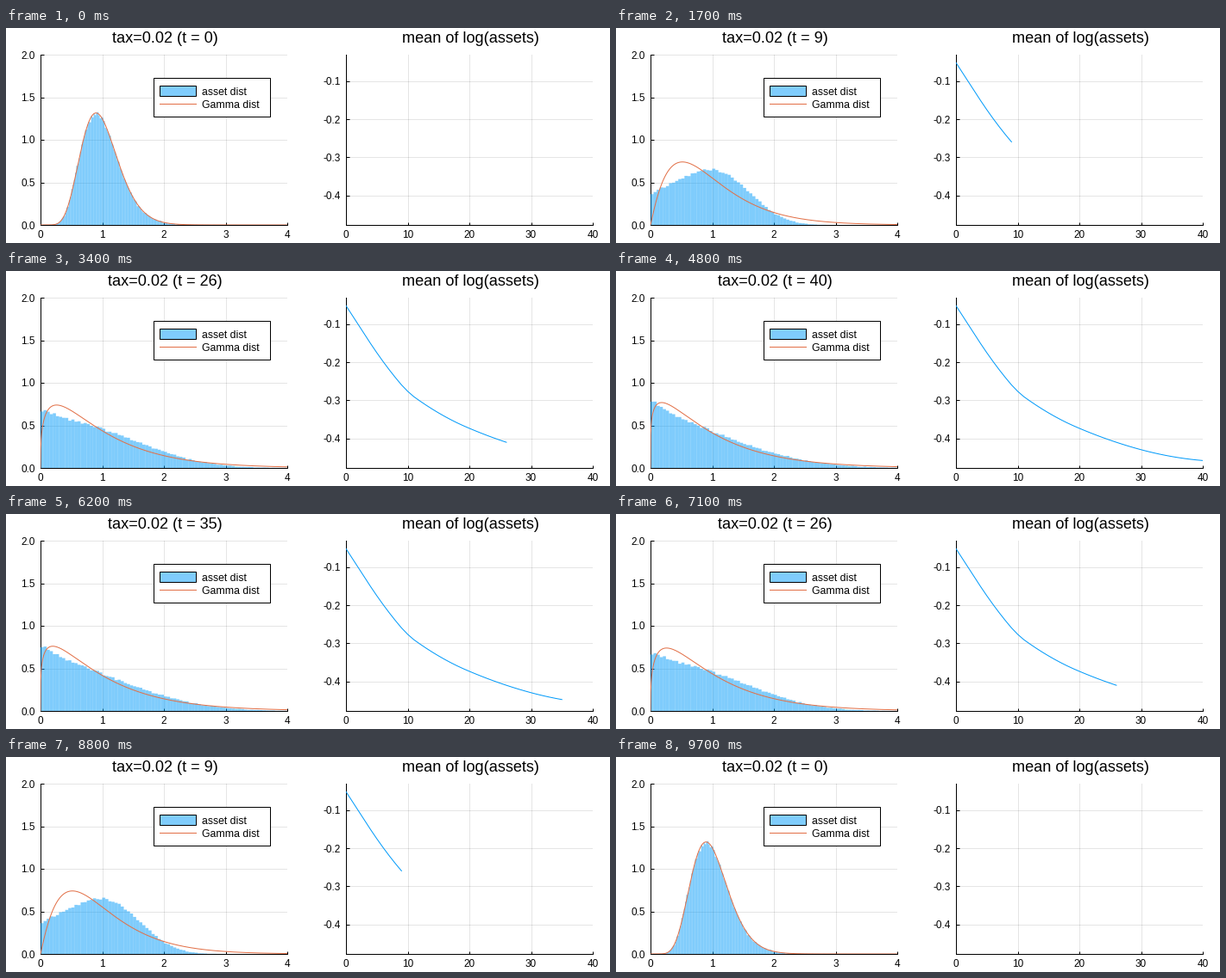
These frames come from a looping animation (700 by 250 pixels, 9.8 s). A matplotlib script:

```python
import math

import matplotlib.pyplot as plt
import numpy as np
from matplotlib.animation import FuncAnimation
from matplotlib.collections import PolyCollection
from matplotlib.patches import Rectangle

W, H, DPI = 700, 250, 100
PX = 72 / DPI
BLUE, ORANGE = "#009AFA", "#E26F46"
FRAMES, START, STEPS = 98, 8, 40
AGENTS = 100_000

plt.rcParams["font.family"] = "Liberation Sans"

xs = np.linspace(0, 4, 1201)
times = np.arange(STEPS + 1)

# Minus the mean of log(assets): it grows at a rate that slows down.
rate = np.interp(times, [0, 4, 9, 12, 20, 30, 40],
                 [0.025, 0.025, 0.0195, 0.0115, 0.007, 0.0045, 0.0015])
loss = 0.051 + np.cumsum(rate) - rate[0]
spread = np.sqrt(loss)


def gamma_fit(x, s):
    """Gamma density of mean 1 whose mean logarithm is -s."""
    k = (3 - s + math.sqrt((s - 3) ** 2 + 24 * s)) / (12 * s)
    scale = math.exp(k * math.log(k) - math.lgamma(k))
    return scale * x ** (k - 1) * np.exp(-k * x)


def draw_from(density, ranks):
    cdf = np.concatenate(([0], np.cumsum((density[1:] + density[:-1]) / 2)))
    return np.interp(ranks, cdf / cdf[-1], xs)


# Assets start gamma distributed and later follow exp(-a x - b x^3).
ranks = np.random.default_rng(3).random(AGENTS)
later = {9: (-0.96, 0.354), 26: (0.287, 0.084), 40: (0.541, 0.052)}
key_times = [0, *later]
key_assets = [draw_from(gamma_fit(xs, loss[0]), ranks)]
key_assets += [draw_from(np.exp(-a * xs - b * xs ** 3), ranks)
               for a, b in later.values()]


def assets_at(t):
    i = min(np.searchsorted(key_times, t, "right") - 1, len(key_times) - 2)
    lo, hi = spread[key_times[i]], spread[key_times[i + 1]]
    f = (spread[t] - lo) / (hi - lo)
    return (1 - f) * key_assets[i] + f * key_assets[i + 1]


def bars_at(t):
    assets = assets_at(t)
    q1, q3 = np.percentile(assets, [25, 75])
    raw_width = 2 * (q3 - q1) / AGENTS ** (1 / 3)
    width = 0.02 if raw_width <= 0.022 else 0.05
    edges = np.arange(0, 4 + width / 2, width)
    heights = np.histogram(assets, edges)[0] / (AGENTS * width)
    return [[(x, 0), (x, h), (x + width, h), (x + width, 0)]
            for x, h in zip(edges, heights) if h > 0]


fig = plt.figure(figsize=(W / DPI, H / DPI), dpi=DPI, facecolor="white")


def make_axes(left, right, xlim, ylim, xticks, yticks):
    top, bottom = 31, 229
    ax = fig.add_axes([left / W, 1 - bottom / H,
                       (right - left) / W, (bottom - top) / H])
    ax.set(xlim=xlim, ylim=ylim, xticks=xticks, yticks=yticks)
    ax.set_yticklabels([f"{y:.1f}" for y in yticks])
    ax.set_axisbelow(True)
    ax.grid(color="black", alpha=0.1, linewidth=PX)
    ax.tick_params(direction="in", length=3.5 * PX, width=PX,
                   labelsize=11.8 * PX)
    ax.tick_params(axis="x", pad=6.5 * PX)
    ax.tick_params(axis="y", pad=6 * PX)
    ax.spines[["top", "right"]].set_visible(False)
    ax.spines[["left", "bottom"]].set_linewidth(PX)
    ax.spines["left"].set_zorder(0.9)
    return ax


dist_ax = make_axes(40, 326, (0, 4), (0, 2), range(5), np.arange(0, 2.1, 0.5))
mean_ax = make_axes(394, 680, (0, 40), (-0.478, -0.03), range(0, 41, 10),
                    [-0.4, -0.3, -0.2, -0.1])

bars = PolyCollection([], facecolor=BLUE, edgecolor="none", alpha=0.5,
                      linewidth=0, snap=False)
dist_ax.add_collection(bars, autolim=False)
gamma_line, = dist_ax.plot([], [], color=ORANGE, lw=PX)
mean_line, = mean_ax.plot([], [], color=BLUE, lw=PX)

# Pixel-space layer for titles and legend.
page = fig.add_axes([0, 0, 1, 1], zorder=5)
page.set(xlim=(0, W), ylim=(H, 0))
page.axis("off")


def box(x0, y0, x1, y1, fill):
    page.add_patch(Rectangle((x0, y0), x1 - x0, y1 - y0, facecolor=fill,
                             edgecolor="black", linewidth=PX))


def label(x, y, text, size, ha):
    return page.text(x, y, text, fontsize=size * PX, ha=ha, va="baseline")


box(171, 58, 306, 103, "white")
box(178, 67, 220, 79, (0, 154 / 255, 250 / 255, 0.5))
page.plot([178, 220], [88, 88], color=ORANGE, lw=PX)
label(227, 78, "asset dist", 12.2, "left")
label(227, 93, "Gamma dist", 12.2, "left")
title = label(184, 17, "", 18.2, "center")
label(538, 17, "mean of log(assets)", 18.2, "center")

all_bars = [bars_at(t) for t in times]


def update(frame):
    t = min(max(frame - START, 0), STEPS, FRAMES - 1 - frame)
    title.set_text(f"tax=0.02 (t = {t})")
    bars.set_verts(all_bars[t])
    gamma_line.set_data(xs, gamma_fit(xs, loss[t]))
    mean_line.set_data(times[:t + 1], -loss[:t + 1])
    return title, bars, gamma_line, mean_line


anim = FuncAnimation(fig, update, frames=FRAMES, interval=100,
                     repeat=True, repeat_delay=0, blit=False)
plt.show()
```
